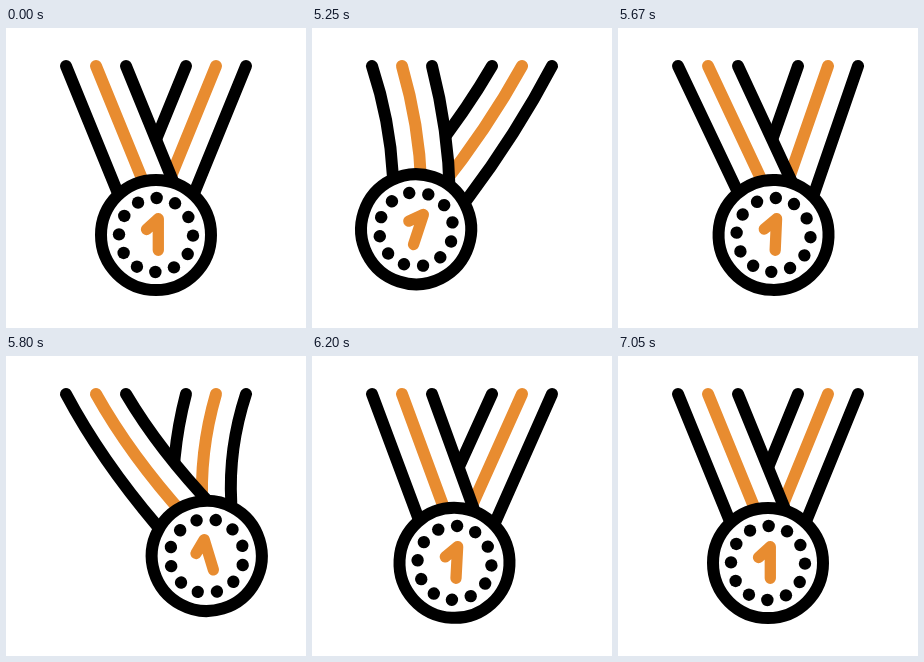
These frames come from a looping animation (300 px wide and 300 px high, 7.1 s). An HTML page with a canvas:

```html
<!DOCTYPE html>
<html lang="en">
<head>
<meta charset="utf-8">
<title>Swinging medal</title>
<style>
  html, body { margin: 0; width: 100%; height: 100%; overflow: hidden; background: #fff; }
  canvas { display: block; }
</style>
</head>
<body>
<canvas width="300" height="300"></canvas>
<script>
const ctx = document.querySelector('canvas').getContext('2d');
const BLACK = '#000', ORANGE = '#e88c30';
const LOOP = 7100, STEP = 25;
const TOP = 38, PIVOT_Y = 20, RADIUS = 187;

// [time, swing of the whole medal, tilt of the disc], in ms and degrees
const keys = [
  [5000, 0, 0], [5025, 1.4, 1.5], [5250, 14.2, 18.2], [5470, 15.8, 20], [5675, -1.7, 2.5],
  [5830, -16.8, -18.5], [5975, -9.4, -13.5], [6200, 2.3, 3], [6270, 2.7, 3.5],
  [6650, -1.1, -1.3], [7050, 0, 0]
];

// Smooth monotone interpolation of one column of the keys, in radians
function track(column) {
  const last = keys.length - 1;
  const rate = i => (keys[i + 1][column] - keys[i][column]) / (keys[i + 1][0] - keys[i][0]);
  const slopes = keys.map((_, i) => {
    if (i === 0) return rate(0);
    if (i === last) return 0;
    const a = rate(i - 1), b = rate(i);
    return a * b > 0 ? 2 * a * b / (a + b) : 0;
  });
  return t => {
    const i = keys.findIndex((key, n) => n < last && t >= key[0] && t < keys[n + 1][0]);
    if (i < 0) return 0;
    const a = keys[i][column], b = keys[i + 1][column];
    const span = keys[i + 1][0] - keys[i][0], u = (t - keys[i][0]) / span, v = 1 - u;
    const value = a * v * v * (1 + 2 * u) + b * u * u * (3 - 2 * u)
      + span * u * v * (slopes[i] * v - slopes[i + 1] * u);
    return value * Math.PI / 180;
  };
}
const swingAt = track(1), tiltAt = track(2);

function disc(x, y, r) {
  ctx.beginPath();
  ctx.arc(x, y, r, 0, 2 * Math.PI);
  ctx.fill();
}

// Curve from a fixed top to a point that turns with the disc
function strandPath(top, dir, pose) {
  const x = top + dir * 51 - 150, y = -44;
  const sin = Math.sin(pose.tilt), cos = Math.cos(pose.tilt);
  const endX = pose.x + x * cos - y * sin;
  const endY = pose.y + x * sin + y * cos;
  ctx.lineTo(top, TOP);
  ctx.quadraticCurveTo((top + endX) / 2 + pose.bow, (TOP + endY) / 2, endX, endY);
}

function drawStrand(color, top, dir, pose) {
  ctx.strokeStyle = color;
  ctx.lineWidth = 12;
  ctx.beginPath();
  strandPath(top, dir, pose);
  ctx.stroke();
}

function drawMedal() {
  ctx.fillStyle = '#fff';
  disc(0, 0, 55);
  ctx.strokeStyle = BLACK;
  ctx.lineWidth = 12;
  ctx.stroke();
  ctx.fillStyle = BLACK;
  for (let i = 0; i < 12; i++) {
    const a = (i * 30 + 1) * Math.PI / 180;
    disc(37 * Math.sin(a), -37 * Math.cos(a), 6.2);
  }
  ctx.strokeStyle = ORANGE;
  ctx.lineWidth = 11.3;
  ctx.beginPath();
  ctx.moveTo(-9.5, -5.5);
  ctx.lineTo(2.3, -16.3);
  ctx.lineTo(2.3, 15.3);
  ctx.stroke();
}

function draw(time) {
  const t = Math.floor((time % LOOP + 5) / STEP) * STEP;
  const swing = swingAt(t);
  const pose = {
    x: 150 - RADIUS * Math.sin(swing),
    y: PIVOT_Y + RADIUS * Math.cos(swing),
    tilt: tiltAt(t),
    bow: 500 * swing ** 3
  };

  ctx.clearRect(0, 0, 300, 300);
  ctx.lineCap = ctx.lineJoin = 'round';

  // Right-hand strands stop at the front one
  ctx.save();
  ctx.beginPath();
  ctx.moveTo(120, 0);
  strandPath(120, 1, pose);
  ctx.lineTo(300, 300);
  ctx.lineTo(300, 0);
  ctx.clip();
  drawStrand(BLACK, 180, -1, pose);
  drawStrand(ORANGE, 210, -1, pose);
  drawStrand(BLACK, 240, -1, pose);
  ctx.restore();

  drawStrand(BLACK, 60, 1, pose);
  drawStrand(ORANGE, 90, 1, pose);
  drawStrand(BLACK, 120, 1, pose);

  ctx.save();
  ctx.translate(pose.x, pose.y);
  ctx.rotate(pose.tilt);
  drawMedal();
  ctx.restore();
}

const start = performance.now();
function tick() {
  draw(performance.now() - start);
  requestAnimationFrame(tick);
}
tick();
</script>
</body>
</html>
```
